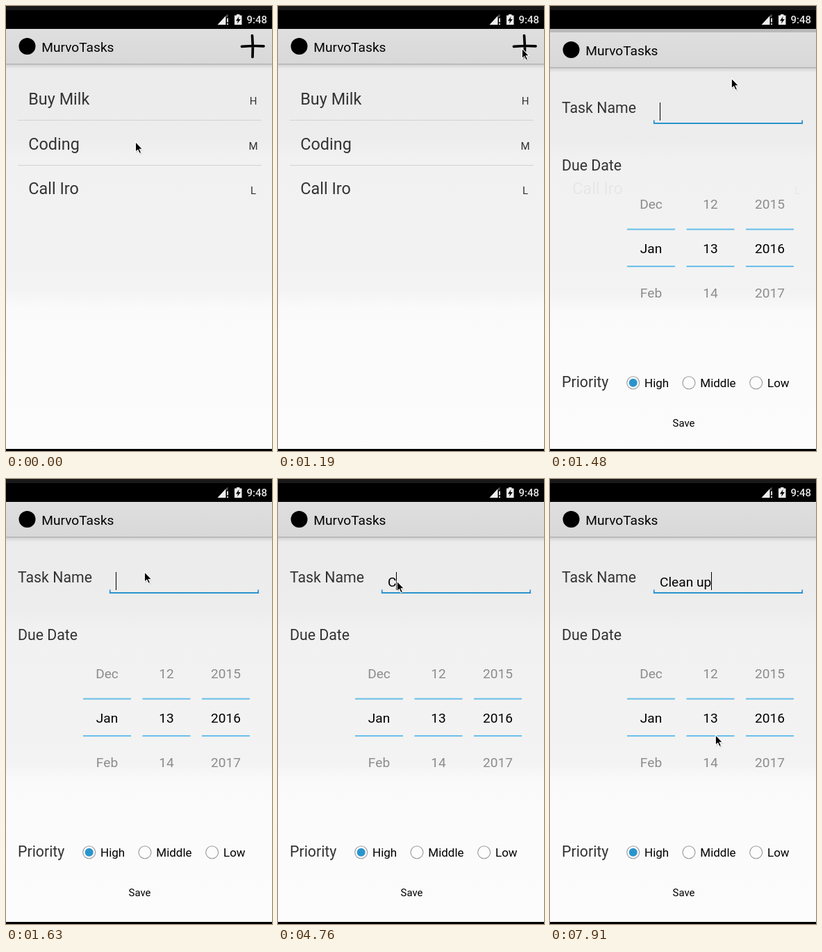
Animation of 383x641 px, one loop 8 s. Source, as an HTML page:

```html
<!DOCTYPE html>
<html lang="en">
<head>
<meta charset="utf-8">
<title>Task list</title>
<style>
  html, body { margin: 0; width: 100%; height: 100%; overflow: hidden; background: #000; }
  svg { display: block; width: 383px; height: 641px; font: 19.15px Roboto, sans-serif; }
  .item { font-size: 23.4px; fill: #333; }
  .rank { font-size: 15px; fill: #333; text-anchor: middle; }
  .label { font-size: 21.3px; fill: #333; }
  .option { font-size: 17px; }
  .mid { text-anchor: middle; }
  .dim { fill: #8c8c8c; }
  #task { white-space: pre; }
</style>
</head>
<body>
<svg viewBox="0 0 383 641">
  <defs>
    <linearGradient id="paper" gradientUnits="userSpaceOnUse" x1="0" y1="85" x2="0" y2="641">
      <stop offset="0" stop-color="#ebebeb"/>
      <stop offset=".19" stop-color="#ededed"/>
      <stop offset=".235" stop-color="#f1f1f1"/>
      <stop offset=".58" stop-color="#f3f3f3"/>
      <stop offset=".63" stop-color="#fafafa"/>
      <stop offset="1" stop-color="#fcfcfc"/>
    </linearGradient>
    <linearGradient id="bar" x2="0" y2="1">
      <stop offset="0" stop-color="#dfdfdf"/>
      <stop offset="1" stop-color="#d8d8d8"/>
    </linearGradient>
    <linearGradient id="shade" x2="0" y2="1">
      <stop offset="0" stop-opacity=".1"/>
      <stop offset="1" stop-opacity="0"/>
    </linearGradient>
  </defs>

  <rect y="33" width="383" height="608" fill="#b9b9b9"/>
  <g id="page">
    <rect y="33" width="383" height="608" fill="url(#paper)"/>
    <rect y="33" width="383" height="51" fill="url(#bar)"/>
    <rect y="83" width="383" height="1.5" fill="#b2b2b2"/>
    <rect y="84.5" width="383" height="6" fill="url(#shade)"/>
    <circle cx="30.5" cy="58" r="12"/>
    <text x="51.3" y="66">MurvoTasks</text>

    <g id="list">
      <path d="M339.5 58.4Q355 57 371 57.8M354.5 42.5Q356 58 355 73.5" fill="none" stroke="#000" stroke-width="3.7" stroke-linecap="round"/>
      <path d="M17 164.5H368M17 229.5H368" stroke="#d2d2d2"/>
    </g>

    <g id="form">
      <text class="label" x="17" y="148.5">Task Name</text>
      <path d="M149.8 159.5V164H363.2V159.5" fill="none" stroke="#2a94cd" stroke-width="1.8"/>
      <text id="task" x="158" y="154.5"></text>
      <rect id="caret" y="134" width="1" height="26"/>
      <text class="label" x="17" y="231.5">Due Date</text>
      <g id="dates"></g>
      <text class="label" x="17" y="543.5">Priority</text>
      <g id="options"></g>
      <text class="mid" x="192.5" y="601" font-size="14.9">Save</text>
    </g>
  </g>
  <g id="ghost" opacity=".05"></g>

  <rect width="383" height="33"/>
  <rect width="383" height="6" fill="#191919"/>
  <rect y="638" width="383" height="3"/>
  <path d="M304.5 27L316.5 14V27Z" fill="#eee"/>
  <path d="M316.5 14L319.5 11.5V16H316.5Z" fill="#555"/>
  <path d="M318.2 17.5H320V23.5H318.2ZM318.2 25H320V27H318.2Z" fill="#eee"/>
  <path d="M329 13.5H332V12H336.5V13.5H339.5V27H329Z" fill="#eee"/>
  <path d="M335.5 15L331 21.5H334L333 25.5L337.8 19H334.8Z"/>
  <text x="346.5" y="25" font-size="15" font-weight="500" fill="#e6e6e6">9:48</text>

  <g id="mouse">
    <path d="M1 1.5V16L4.4 13L6.8 18L9.2 17L7 12H11.5Z" opacity=".2"/>
    <path d="M0 0V14.5L3.4 11.6L5.7 16.7L8.2 15.6L5.9 10.7H10.4Z" stroke="#fff" stroke-width="1.1"/>
  </g>
</svg>
<script>
const $ = id => document.getElementById(id);
const add = (id, markup) => $(id).insertAdjacentHTML('beforeend', markup);
const text = (cls, x, y, s) => `<text class="${cls}" x="${x}" y="${y}">${s}</text>`;
const clamp = (v, max) => Math.max(0, Math.min(max, v));

const rows = ['Buy Milk', 'Coding', 'Call Iro'].map((name, i) => {
  const y = 142 + i * 64.5;
  return text('item', 32.3, y, name) + text('rank', 356, y, 'HML'[i]);
});
add('list', rows.join(''));
add('ghost', rows[2]);

[['Dec', 'Jan', 'Feb'], [12, 13, 14], [2015, 2016, 2017]].forEach((column, i) => {
  const x = 145.5 + i * 85.5;
  column.forEach((s, j) => add('dates', text(j == 1 ? 'mid' : 'mid dim', x, 287 + j * 64, s)));
  for (const y of [315.6, 369])
    add('dates', `<rect x="${x - 34.5}" y="${y}" width="69" height="2.1" fill="#6cc1eb"/>`);
});

[['High', 119.7], ['Middle', 200], ['Low', 296.7]].forEach(([s, x], i) => {
  add('options', `<circle cx="${x}" cy="537.7" r="9" fill="#fcfcfc" stroke="#999" stroke-width="1.1"/>`);
  if (!i) add('options', `<circle cx="${x}" cy="537.7" r="6" fill="#2a94cd"/>`);
  add('options', text('option', x + 16.3, 544, s));
});

const tickAt = t => Math.floor((t + 18) / 149.2);
const OPEN = 10;

// Resting places of the pointer: tick, x, y.
const stops = [
  [0, 186.5, 195.7], [8, 351.3, 61.2], [12, 171.3, 147.2],
  [47, 171.3, 147.2], [49, 227, 400], [51, 237.5, 400], [53, 238.3, 368.7]
];

function pointer(tick) {
  const next = stops.findIndex(s => s[0] >= tick);
  const [t1, x1, y1] = stops[next], [t0, x0, y0] = stops[Math.max(0, next - 1)];
  const p = t1 > t0 ? (tick - t0) / (t1 - t0) : 1;
  const ease = p * p * (3 - 2 * p);
  return [x0 + (x1 - x0) * ease, y0 + (y1 - y0) * ease];
}

// One letter, then a quick burst, then a slower ending.
const typedCount = tick =>
  (tick >= 32) + clamp(tick - 35, 5) + clamp(Math.floor((tick - 42) / 2), 2);

// The caret blinks steadily and starts over after each key.
function caretOn(tick) {
  let key = tick;
  while (key > OPEN && typedCount(key) == typedCount(key - 1)) key--;
  return Math.floor((tick - key + .9) / 3.2) % 2 == 0;
}

const show = (id, on) => $(id).style.display = on ? '' : 'none';

function draw(tick) {
  const opening = tick == OPEN, open = tick >= OPEN;
  show('list', !open);
  show('form', open);
  show('ghost', opening);
  $('page').setAttribute('transform', `translate(0 ${opening ? 5 : 0})`);

  const typed = 'Clean up'.slice(0, typedCount(tick));
  $('task').textContent = typed;
  const width = typed ? $('task').getComputedTextLength() : 0;
  $('caret').setAttribute('x', Math.floor(158 + width));
  show('caret', caretOn(tick));
  $('mouse').setAttribute('transform', `translate(${pointer(tick)})`);
}

const start = performance.now();
function run() {
  draw(tickAt((performance.now() - start) % 8000));
  requestAnimationFrame(run);
}
run();
</script>
</body>
</html>
```
